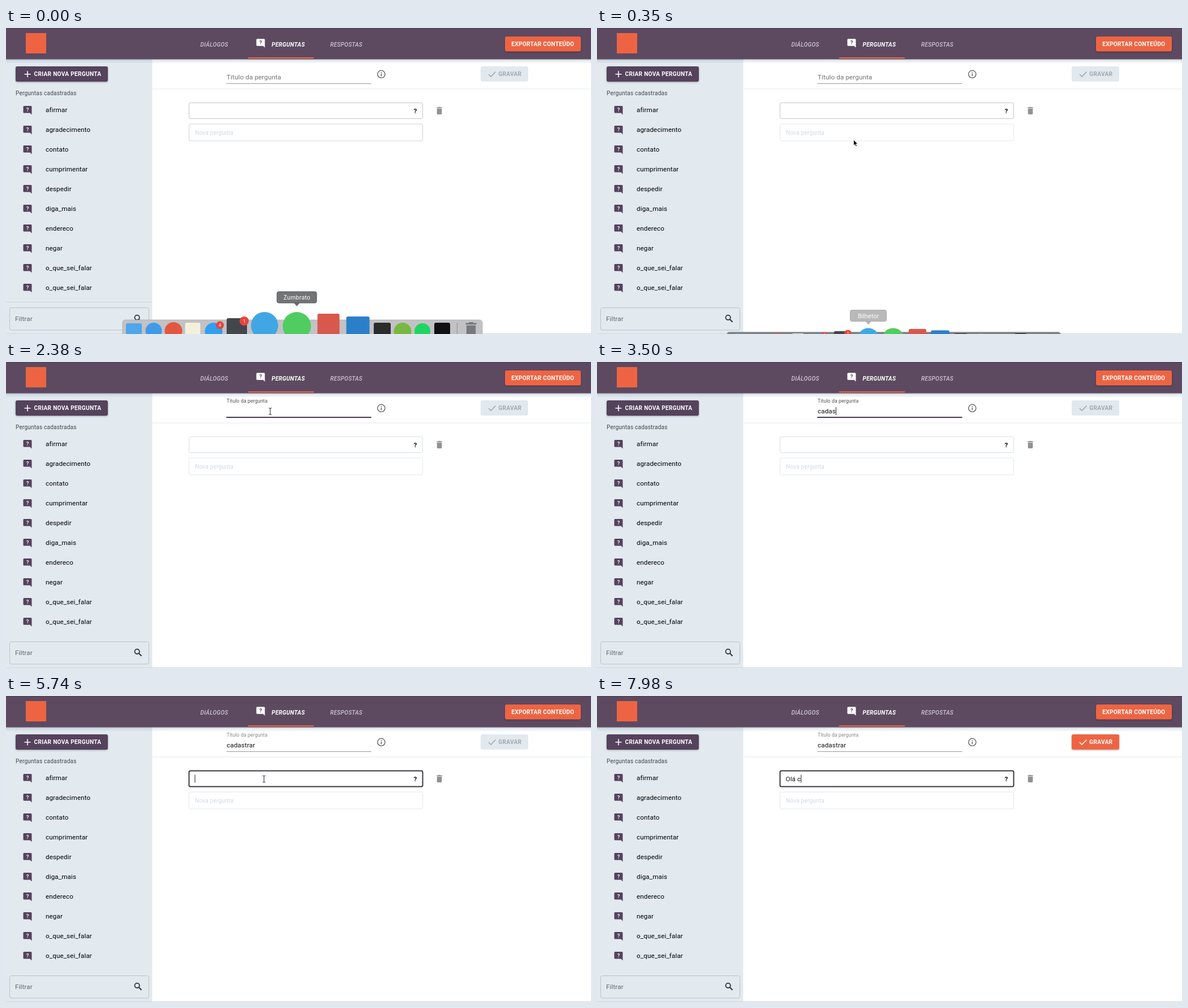
Recreate the animation shown at these times as an HTML page. Size 1034 px wide and 542 px high, loop 8 s.

```html
<!DOCTYPE html>
<html lang="pt">
<head>
<meta charset="utf-8">
<style>
  html, body { margin: 0; width: 100%; height: 100%; overflow: hidden; background: #fff; }
  svg { display: block; width: 1034px; height: 542px; font-family: Roboto, sans-serif; }
  .body { font-size: 11.7px; letter-spacing: .1px; }
  .small { font-size: 10.2px; letter-spacing: .13px; }
  .caps { font-size: 10.2px; letter-spacing: .25px; font-weight: 700; fill: #fff; }
  .tab { font-style: italic; font-weight: 500; fill: #cdc5d0; }
  .tip { font: 10.4px Inter, sans-serif; fill: #fff; text-anchor: middle; }
  .badge { font: 8px Inter, sans-serif; fill: #fff; text-anchor: middle; }
  .raised { filter: drop-shadow(0 1px 1.5px #0005); }
</style>
</head>
<body>
<svg viewBox="0 0 1034 542">
  <defs>
    <linearGradient id="shade" x2="0" y2="1">
      <stop stop-color="#4b3c52" stop-opacity=".65"/>
      <stop offset=".35" stop-color="#9db4c4" stop-opacity=".25"/>
      <stop offset="1" stop-color="#9db4c4" stop-opacity=".12"/>
    </linearGradient>
  </defs>
  <g id="page"></g>
  <g id="live"></g>
</svg>
<script>
const LOOP = 8000;
const ORANGE = '#ee6443', PURPLE = '#5d4a61', DEEP = '#55425c', INK = '#111113';
const TITLE_FOCUS = 1610, QUESTION_FOCUS = 5460, SAVE_READY = 6510;

const clamp = (v, a = 0, b = 1) => Math.min(b, Math.max(a, v));
const mix = (a, b, p) => a + (b - a) * p;
const ease = p => p * p * (3 - 2 * p);

const rect = (x, y, w, h, fill, r = 0, extra = '') =>
  `<rect x="${x}" y="${y}" width="${w}" height="${h}" rx="${r}" fill="${fill}" ${extra}/>`;
const circle = (x, y, r, fill, extra = '') =>
  `<circle cx="${x}" cy="${y}" r="${r}" fill="${fill}" ${extra}/>`;
const text = (x, y, str, cls, fill) =>
  `<text x="${x}" y="${y}" class="${cls}" ${fill ? `style="fill:${fill}"` : ''}>${str}</text>`;
const path = (d, fill, extra = '') => `<path d="${d}" fill="${fill}" ${extra}/>`;
const stroke = (color, width = 1) => `stroke="${color}" stroke-width="${width}"`;

const bubble = (x, y, fill, mark) => `<g transform="translate(${x} ${y})">
  ${path('M1.5 0H13.5Q15 0 15 1.5V15.5L12 12.5H1.5Q0 12.5 0 11V1.5Q0 0 1.5 0Z', fill)}
  <text x="7.5" y="9.7" font-size="9.5" font-weight="700" text-anchor="middle" fill="${mark}">?</text></g>`;

const bin = (x, y, s, fill) => path(
  'M-5-4.6V-6H-2.4L-1.6-6.8H1.6L2.4-6H5V-4.6ZM-4.3-3.8H4.3V5Q4.3 6.4 3 6.4H-3Q-4.3 6.4-4.3 5Z',
  fill, `transform="translate(${x} ${y}) scale(${s})"`);

function page() {
  const names = ['afirmar', 'agradecimento', 'contato', 'cumprimentar', 'despedir', 'diga_mais',
    'endereco', 'negar', 'o_que_sei_falar', 'o_que_sei_falar'];
  const rows = names.map((name, i) =>
    bubble(30.5, 138 + i * 35, DEEP, '#e2e9ef') + text(70, 149 + i * 35, name, 'body', '#000'));
  return [
    rect(0, 0, 1034, 542, '#fff'),
    rect(0, 55, 258.5, 487, '#e2e9ef'),
    rect(0, 55, 1034, 7, 'url(#shade)'),
    rect(0, 0, 1034, 55, PURPLE),
    rect(0, 0, 1034, 1, '#4b4150'),
    rect(35, 9, 36, 36, ORANGE),
    text(343.5, 32.6, 'DIÁLOGOS', 'caps tab'),
    bubble(442.5, 19.3, '#fff', PURPLE),
    text(469.5, 32.6, 'PERGUNTAS', 'caps', '#fff;font-style:italic'),
    text(573, 32.6, 'RESPOSTAS', 'caps tab'),
    rect(428, 52, 116, 2, ORANGE),
    rect(882, 15, 134, 26.5, ORANGE, 3, 'class="raised"'),
    text(893.3, 32, 'EXPORTAR CONTEÚDO', 'caps'),
    rect(17, 68, 163, 27, DEEP, 3, 'class="raised"'),
    path('M32.5 81.7H43.5M38 76.2V87.2', 'none', stroke('#fff', 1.6)),
    text(49.5, 85.2, 'CRIAR NOVA PERGUNTA', 'caps'),
    text(17, 118.5, 'Perguntas cadastradas', 'small', '#44474c'),
    ...rows,
    rect(6.5, 495.5, 246, 39.5, 'none', 3, stroke('#bac2c9')),
    text(16, 518.6, 'Filtrar', 'body', '#62676d'),
    circle(231.7, 512.8, 4.2, 'none', stroke('#303236', 1.8)),
    path('M234.8 516L239.5 520.7', 'none', stroke('#303236', 2.1)),
    rect(259, 107.5, 775, 1, '#e1e8ee'),
    circle(663.3, 81.8, 6.6, 'none', stroke('#55575a', 1.3)),
    rect(662.6, 80.8, 1.4, 4.4, '#55575a'),
    rect(662.6, 78.2, 1.4, 1.4, '#55575a'),
    bin(766, 146.5, 1, '#919191'),
    text(720.5, 150.7, '?', 'body', `${INK};font-weight:700`),
    rect(0, 541, 1034, 1, '#d3d6da')
  ].join('');
}

// Typed fields: the text with the moment each letter appears.
const titleField = { str: 'cadastrar', keys: [2870, 3010, 3150, 3360, 3430, 3570, 3710, 3850, 4130] };
const questionField = { str: 'Olá c', keys: [6510, 6790, 7140, 7350, 7770] };

function typed(field, t, x, y, focusStart, focusEnd) {
  const count = field.keys.filter(k => k <= t).length;
  const last = count ? field.keys[count - 1] : focusStart;
  const caret = t >= focusStart && t < focusEnd && (t - last) % 1000 < 500;
  const shown = field.str.slice(0, count);
  return `<text x="${x}" y="${y}" class="body" fill="${INK}" xml:space="preserve">${shown}</text>` +
    (caret ? rect(x + textWidth(shown), y - 11, 1, 14, '#222') : '');
}

const pen = document.createElement('canvas').getContext('2d');
function textWidth(str) {
  pen.font = '11.7px Roboto, sans-serif';
  return pen.measureText(str).width + str.length * .1;
}

function form(t) {
  const focus = ease(clamp((t - TITLE_FOCUS) / 150));
  const editing = t >= TITLE_FOCUS && t < QUESTION_FOCUS;
  const asking = t >= QUESTION_FOCUS;
  const ready = t >= SAVE_READY;
  const label = `<text class="body" fill="${editing ? '#505055' : focus ? '#85878b' : '#707276'}"
    transform="translate(390 ${mix(91, 72.3, focus)}) scale(${mix(1, .75, focus)})">Título da pergunta</text>`;
  const half = 128 * focus;
  const line = rect(389.5, 98, 256, 1, '#98989b') +
    (editing ? rect(517.5 - half, 97, half * 2, 2, '#46374d') : '');
  const near = t < 1100 || (t > 4700 && t < QUESTION_FOCUS);
  const border = asking ? stroke('#3d3641', 2) : stroke(near ? '#c4c6c8' : '#d6dfe5');
  const saveInk = ready ? '#fff' : '#a4a7ac';
  return [
    label, line,
    typed(titleField, t, 390, 91, TITLE_FOCUS, QUESTION_FOCUS),
    rect(839, 68, 84, 26.7, ready ? ORANGE : '#e1e9ef', 3, ready ? 'class="raised"' : ''),
    path('M853 82L857 86L865.5 77.5', 'none', stroke(saveInk, 1.6)),
    text(870.3, 85.2, 'GRAVAR', 'caps', saveInk),
    rect(323.5, 132.5, 413, 28, 'none', 2.5, border),
    typed(questionField, t, 333.5, 150.5, QUESTION_FOCUS, LOOP),
    rect(323.5, 170, 413, 30, 'none', 2.5, stroke(t < 70 ? '#d2d4d6' : '#e0e8ed')),
    text(334, 188.7, 'Nova pergunta', 'small', '#d0dae2'),
    t < 280 ? rect(0, 485, 258, 1, '#cfd6dc') : ''
  ].join('');
}

// Dock items: centre x, top, size, colour, round, badge
const dockItems = [
  [226, 523, 28, '#4fa6ea'], [261, 522, 29, '#3f9be8', 1], [296, 521, 31, '#e2573f', 1],
  [330, 522, 27, '#f5f0dc'], [367, 522, 31, '#309ff0', 1, '4'], [408, 514, 36, '#43474b', 0, '1'],
  [457, 503, 48, '#41a7e4', 1], [514, 503, 50, '#50cd60', 1], [570, 506, 39, '#d9584c'],
  [622, 511, 41, '#2b7fc9'], [665, 522, 30, '#2b2c2e'], [701, 522, 31, '#77b940', 1],
  [736, 523, 28, '#1fd561', 1], [771, 522, 28, '#111114']
];

function dock(t) {
  const p = Math.max(0, (t - 70) / 280);
  if (p > 1.6) return '';
  const slideX = x => x + clamp((555 - x) * .23, -22, 25) * p;
  const slideY = y => y + (21.5 + .5 * (517 - y)) * p;
  const left = slideX(206) - 2 * p, right = slideX(842);
  const tone = Math.round(mix(194, 128, clamp(p)));
  let out = rect(left, slideY(517), right - left, 60, `rgb(${tone},${tone},${tone + 2})`, 5, stroke('#a5a5a8', .7));
  for (const [x0, y0, size0, fill, round, badge] of dockItems) {
    const x = slideX(x0), y = slideY(y0), size = size0 * (1 - .2 * p);
    out += round ? circle(x, y + size / 2, size / 2, fill) : rect(x - size / 2, y, size, size, fill, 3);
    if (badge) {
      const r = size * .225, bx = x + size * .36, by = y + size * .14;
      out += circle(bx, by, r, '#e8453c') + text(bx, by + 2.8, badge, 'badge');
    }
  }
  out += rect(slideX(797), slideY(522), 1, 30, '#8f8f93') + bin(slideX(822), slideY(521) + 13, 1.9, '#77797c');

  const first = t < 140;
  const [x0, y0] = dockItems[first ? 7 : 6];
  const x = slideX(x0), y = slideY(y0) - mix(36, 32, p), w = first ? 35 : 32;
  const opacity = p < 1 ? mix(1, .5, p) : clamp(1.5 - p);
  return out + `<g opacity="${opacity}">
    ${path(`M${x - 5} ${y + 20}L${x} ${y + 26}L${x + 5} ${y + 20}Z`, '#6c6d6e')}
    ${rect(x - w, y, w * 2, 20, '#737475', 3, stroke('#535455', 1))}
    ${text(x, y + 14, first ? 'Zumbrato' : 'Bilhetor', 'tip')}</g>`;
}

// Pointer stops: time, x, y
const stops = [
  [0, 490, 548], [70, 490, 548], [350, 453.5, 198], [700, 464, 138], [840, 464, 138], [1260, 467, 87.5],
  [4270, 467, 87.5], [4620, 465, 120], [5110, 459, 180], [5390, 456, 147], [8000, 456, 147]
];

function pointer(t) {
  const hidden = (t >= 2870 && t < 4270) || t >= SAVE_READY;
  if (hidden) return '';
  const i = stops.findIndex(s => s[0] > t);
  const [t0, x0, y0] = stops[i - 1], [t1, x1, y1] = stops[i];
  const p = ease((t - t0) / (t1 - t0));
  const x = mix(x0, x1, p), y = mix(y0, y1, p);
  const onButton = t > 4270 && y > 169;
  const onText = t > TITLE_FOCUS && (y < 98 || (y > 132 && y < 161));
  const shape = onButton
    ? path('M-2-6Q-1-7 0-6V-1.6Q1.4-2.3 1.9-1.3Q3.2-1.9 3.7-.8Q5-1 5 .3V3L3.8 6.3H-1.6L-4.8 1.5Q-5 0-3.4.4L-2 1.8Z',
      '#fff', stroke('#111', 1.1))
    : onText
      ? path('M-2.5-6Q0-6 0-4.5Q0-6 2.5-6M0-4.5V4.5M-2.5 6Q0 6 0 4.5Q0 6 2.5 6', 'none', stroke('#222'))
      : path('M0 0V10.2L2.3 8L4 11.8L5.9 11L4.2 7.3H7.3Z', '#000', stroke('#fff', .8));
  return `<g transform="translate(${x} ${y})">${shape}</g>`;
}

const live = document.getElementById('live');
document.getElementById('page').innerHTML = page();

function draw() {
  const t = performance.now() % LOOP;
  live.innerHTML = form(t) + dock(t) + pointer(t);
  requestAnimationFrame(draw);
}
draw();
</script>
</body>
</html>
```
